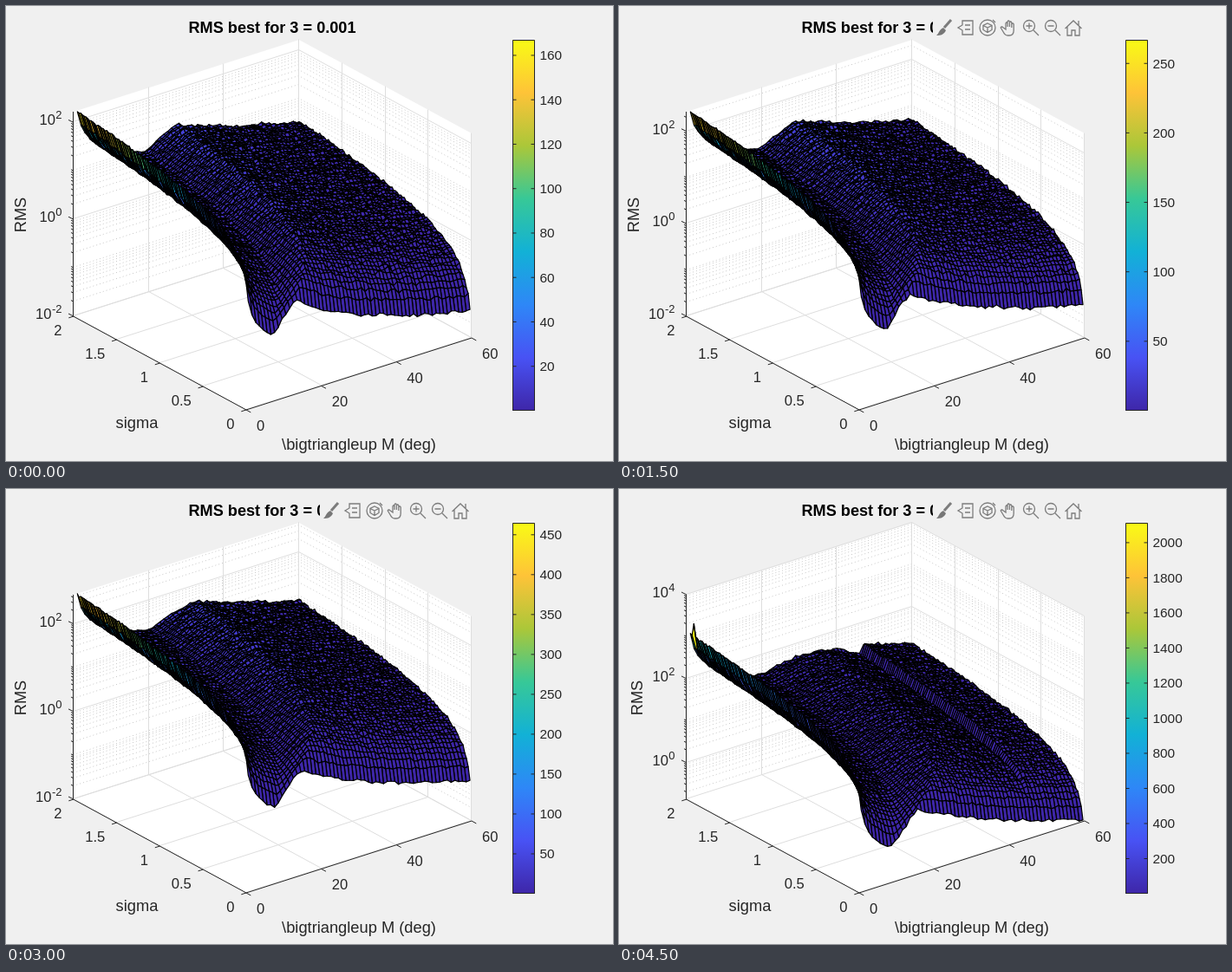
Animation of 700x525 px, one loop 5000 ms. Source, as an HTML page with a canvas:

```html
<!DOCTYPE html>
<html lang="en">
<head>
<meta charset="utf-8">
<title>RMS surface</title>
<style>
html, body { margin: 0; width: 100%; height: 100%; overflow: hidden; background: #f0f0f0; }
canvas, svg { position: absolute; left: 0; top: 0; }
svg { font-family: "Liberation Sans", Arial, sans-serif; font-size: 16.6px; fill: #262626; }
.axis { stroke: #262626; fill: none; }
.name { font-size: 18.3px; text-anchor: middle; }
.title { font-size: 18.15px; font-weight: bold; fill: #000; text-anchor: middle; }
.exp { font-size: 13px; }
.bar { font-size: 15.4px; }
.end { text-anchor: end; }
.tools { stroke: #7c7c7c; stroke-width: 1.3; fill: none; }
</style>
</head>
<body>
<canvas id="plot" width="700" height="525"></canvas>
<svg id="overlay" width="700" height="525" viewBox="0 0 700 525"></svg>
<script>
const ctx = document.getElementById('plot').getContext('2d');
const overlay = document.getElementById('overlay');
const STEP = 500, STATES = 10, COLS = 60, ROWS = 100;
const PEAKS = [167, 197, 232, 267, 307, 378, 465, 590, 749, 1130];
const SPIKE = 1.87; // outlier in the last state, relative to its peak
const PARULA = ['#3e26a8', '#4852f4', '#2e87f7', '#12b1d6', '#37c897', '#abc739', '#fec338', '#f9fb15']
  .map(hex => [1, 3, 5].map(i => parseInt(hex.slice(i, i + 2), 16)));

const clamp = v => Math.min(1, Math.max(0, v));

// Every property of the surface follows from the state number.
function paramsFor(n) {
  const last = n === STATES - 1;
  const max = PEAKS[n] * (last ? SPIKE : 1);
  const base = .54 + .045 * n + .0023 * n * n;
  const tightLow = n === 7 || last;
  return {
    last, max, base,
    top: Math.log10(max),
    low: tightLow ? base - 2 : Math.floor(base - 2),
    high: n < 8 ? Math.log10(max) : Math.ceil(Math.log10(max)),
    peak: Math.log10(PEAKS[n]) - .025,
    fall: 1 + .15 * (n / 9) ** 6,
    bend: 2.3 + .14 * n,
    curve: -.26 - .155 * n,
    back: .465 + .0022 * n * n,
    front: .225 + .0005 * n * n,
    ratio: .66 - .00022 * n ** 3,
    dip: .27 * 3 ** (n - 9)
  };
}

function parula(v) {
  const x = clamp(v) * (PARULA.length - 1), i = Math.min(PARULA.length - 2, Math.floor(x));
  return `rgb(${PARULA[i].map((a, c) => Math.round(a + (PARULA[i + 1][c] - a) * (x - i)))})`;
}

function seeded(seed) {
  return () => {
    seed = (seed + 0x6d2b79f5) | 0;
    let t = Math.imul(seed ^ (seed >>> 15), 1 | seed);
    t = (t + Math.imul(t ^ (t >>> 7), 61 | t)) ^ t;
    return ((t ^ (t >>> 14)) >>> 0) / 4294967296;
  };
}

// m, s, z run from 0 to 1 along the three axes.
const project = (m, s, z = 0) => [277 + 260 * m - 199 * s, 466 - 83 * m - 108 * s - 236 * z];

// log10 of the RMS and the weight of the right-hand branch
function height(p, m, s) {
  const u = Math.log10(s) / 2 + 1, d = -Math.log10(m);
  const left = p.peak - p.fall * (Math.log10(COLS) - d);
  let right = p.base + p.bend * d + p.curve * d * d;
  if (m < .778) right -= p.dip * Math.exp((m - .778) / (p.dip * .9)) * clamp((u - .3) / .45);
  const crest = p.front * (p.back / p.front) ** u;
  const foot = crest * (.54 + (p.ratio - .54) * u);
  const mix = clamp(Math.log(m / foot) / Math.log(crest / foot)) ** 1.3;
  return [left + (right - left) * mix + Math.log10(s), mix];
}

function polygon(points) {
  ctx.beginPath();
  points.forEach(q => ctx.lineTo(q[0], q[1]));
}

const snap = q => q.map(v => Math.floor(v - .5) + .5);

function line(major, ...points) {
  ctx.strokeStyle = major ? '#dedede' : '#c8c8c8';
  ctx.setLineDash(major ? [] : [1, 3]);
  polygon(points.map(snap));
  ctx.stroke();
}

function eachLevel(p, visit) {
  const span = p.high - p.low, every = span === 4 ? 1 : 2;
  for (let e = Math.floor(p.low); e <= p.high; e++) {
    for (let k = 1; k < 10; k++) {
      const z = (e + Math.log10(k) - p.low) / span;
      if (z > -1e-6 && z < 1.00001) visit(z, k === 1 && e % every === 0, e);
    }
  }
}

function drawWalls(p) {
  ctx.lineWidth = 1;
  ctx.fillStyle = '#fff';
  polygon([project(0, 0), project(1, 0), project(1, 0, 1), project(1, 1, 1), project(0, 1, 1), project(0, 1)]);
  ctx.fill();
  eachLevel(p, (z, major) => line(major, project(0, 1, z), project(1, 1, z), project(1, 0, z)));
  for (let i = 0; i <= 3; i++) line(true, project(i / 3, 0), project(i / 3, 1), project(i / 3, 1, 1));
  for (let i = 0; i <= 4; i++) line(true, project(0, i / 4), project(1, i / 4), project(1, i / 4, 1));
  ctx.setLineDash([]);
}

function drawSurface(p, state) {
  const random = seeded(71 + state), grid = [];
  for (let r = 0; r < ROWS; r++) {
    grid.push([]);
    for (let c = 0; c < COLS; c++) {
      const m = (c + 1) / COLS, s = (r + 1) / ROWS;
      const [level, mix] = height(p, m, s);
      const noise = (random() + random() + random() - 1.5) * (.026 + .018 * mix);
      const isSpike = p.last && c === 0 && r === ROWS - 3;
      const log = isSpike ? p.top : Math.max(p.low, Math.min(p.top, level + noise));
      const [x, y] = project(m, s, (log - p.low) / (p.high - p.low));
      grid[r].push([x, y, 10 ** log / p.max]);
    }
  }
  ctx.strokeStyle = '#000';
  ctx.lineWidth = 1.25;
  ctx.lineJoin = 'round';
  for (let r = ROWS - 2; r >= 0; r--) {
    for (let c = COLS - 2; c >= 0; c--) {
      polygon([grid[r][c], grid[r][c + 1], grid[r + 1][c + 1], grid[r + 1][c]]);
      ctx.closePath();
      ctx.fillStyle = parula(grid[r][c][2]);
      ctx.fill();
      ctx.stroke();
    }
  }
}

function drawColorbar() {
  const ramp = ctx.createLinearGradient(0, 467, 0, 39);
  PARULA.forEach((rgb, i) => ramp.addColorStop(i / (PARULA.length - 1), `rgb(${rgb})`));
  ctx.fillStyle = ramp;
  ctx.fillRect(584, 39, 26, 428);
}

const text = (x, y, content, cls = '', extra = '') => `<text x="${x}" y="${y}" class="${cls}" ${extra}>${content}</text>`;
const tick = ([x, y], dx, dy) => `M${x} ${y}l${dx} ${dy}`;
const lens = (x, sign) => `<circle cx="${x}" cy="23" r="6.5"/><path d="M${x + 5} 28l6 6M${x - 3.5} 23h7${sign}"/>`;

const TOOLS = `<rect x="362" y="13" width="176" height="25" fill="#f0f0f0"/><g class="tools">
<path d="M383 16l-8 9" stroke-width="3"/><path d="M374 25l3 3c-2 5-6 6-11 6 3-2 3-7 8-9z" fill="#777" stroke="none"/>
<path d="M396 17h12v16h-12v-5l-5-3 5-3zM399 22h6M399 27h6"/>
<circle cx="425" cy="25" r="9"/><path d="M425 20l5 2.5v5l-5 3-5-3v-5zM420 22.5l5 2.5 5-2.5M425 25v5M431 16l3 3"/>
<path d="M446 27v-7q1-2 2 0v4-6q1.2-2 2.4 0v6-5q1.2-2 2.4 0v6-4q1.2-2 2.4 0v7q0 6-5 6h-2q-3 0-5-4l-3-5q1-2 3 0z"/>
${lens(473, 'm-3.5-3.5v7')}${lens(498, '')}
<path d="M514.5 26l9.5-9 9.5 9M517 24v10h5v-6h4v6h5v-10M530 17v5"/></g>`;

function drawOverlay(p, state) {
  let path = 'M77.5 122V358L277 466L537 383', out = '';
  for (let i = 0; i <= 4; i++) {
    const q = project(0, i / 4);
    path += tick(q, -5.7, 1.8);
    out += text(q[0] - 13.5, q[1] + 22, i / 2, 'end');
  }
  for (let i = 0; i <= 3; i++) {
    const q = project(i / 3, 0);
    path += tick(q, 5.3, 2.9);
    out += text(q[0] + 12, q[1] + 24, i * 20);
  }
  eachLevel(p, (z, major, e) => {
    const q = project(0, 1, z);
    path += major ? tick(q, -6, -3) : tick(q, -3, -1.6);
    if (!major) return;
    out += text(e < 0 ? 52.5 : 57, q[1] + 3, 10, 'end') + text(64.5, q[1] - 4, e, 'exp end');
  });

  const barStep = [20, 50, 100, 200].find(n => p.max / n < 12.5);
  path += 'M584.5 39.5h25v427h-25z';
  for (let v = barStep; v < p.max; v += barStep) {
    const y = 467 - 428 * v / p.max;
    path += `M610 ${y}h-4.5M584 ${y}h4.5`;
    out += text(615.5, y + 5.5, v, 'bar');
  }

  const nameX = Number.isInteger(p.low) ? 23 : 27;
  out += text(151, 487, 'sigma', 'name') + text(407, 512, '\\bigtriangleup M (deg)', 'name');
  out += text(0, 0, 'RMS', 'name', `transform="translate(${nameX} 241) rotate(-90)"`);
  out += text(307, 31, `RMS best for 3 = ${((state + 1) / 1000).toFixed(3)}`, 'title');
  overlay.innerHTML = `<path class="axis" d="${path}"/>${out}${state > 1 ? TOOLS : ''}`;
}

function draw(state) {
  const p = paramsFor(state);
  ctx.fillStyle = '#f0f0f0';
  ctx.fillRect(0, 0, 700, 525);
  drawWalls(p);
  drawSurface(p, state);
  drawColorbar();
  drawOverlay(p, state);
}

const start = performance.now();
let shown = -1;
function frame() {
  const state = Math.floor((performance.now() - start) / STEP) % STATES;
  if (state !== shown) draw(shown = state);
  requestAnimationFrame(frame);
}
frame();
</script>
</body>
</html>
```
